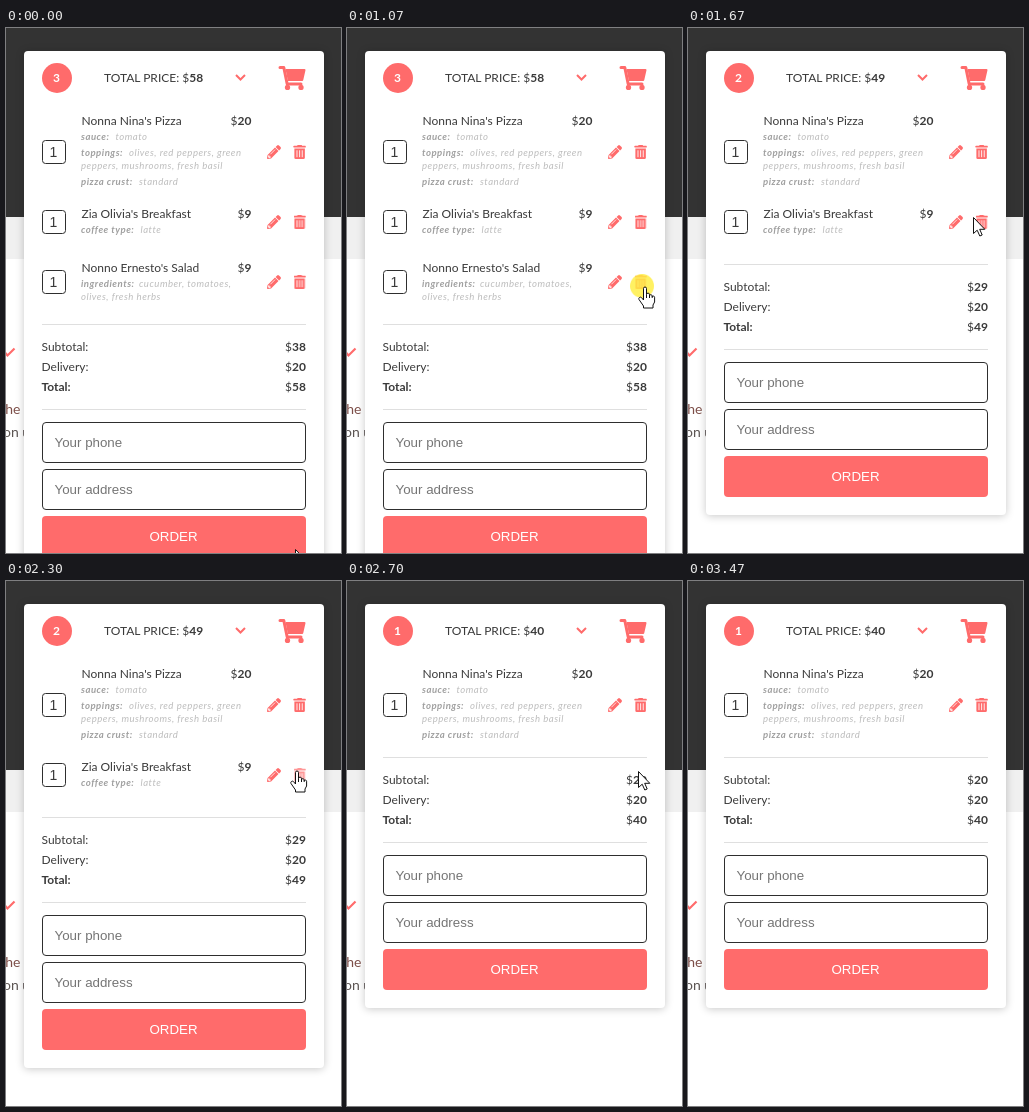
An HTML page for the animation above (3.85 s loop, 335x525 px).

```html
<!DOCTYPE html>
<html lang="en">
<head>
<meta charset="utf-8">
<title>Shopping cart</title>
<style>
  html, body { margin: 0; width: 100%; height: 100%; overflow: hidden; background: #fff; }
  .stage { position: relative; width: 335px; height: 525px; overflow: hidden;
    background: linear-gradient(#333 189px, #f0f0f0 189px 231px, #fff 231px); }
  .stage > svg { position: absolute; left: 0; top: 0; }
  .card { position: absolute; left: 18px; top: 23px; width: 300px; height: 524px;
    background: #fff; border-radius: 4px; box-shadow: 0 1px 8px rgba(0, 0, 0, .22); }

  text { font: 12px Lato, sans-serif; fill: #3a3a3a; }
  b, .b { font-weight: 700; }
  .end { text-anchor: end; }
  .mid { text-anchor: middle; }
  .label, .value { font-size: 9.6px; font-style: italic; letter-spacing: .5px; }
  .label { font-weight: 700; fill: #a0a0a0; }
  .value { fill: #bdbdbd; }
  .ui { font: 13.333px "Liberation Sans", Arial, sans-serif; }
  .hint { fill: #757575; }
  .white { fill: #fff; }
  .copy { font-size: 14px; }
  .red { fill: #ff6b6b; }
  .line { fill: none; stroke: #ff6b6b; }
  .rule { stroke: #dfdfdf; }
  .field { fill: #fff; stroke: #2e2e2e; }

  /* every animation shares one loop and holds its value between keys */
  .card, .one, .two, .three, .kept, .below, .cursor, .arrow, .hand, .ring, .hot3, .hot2 {
    animation: 3850ms step-end infinite; }
  .card { animation-name: shrink; }
  .below { animation-name: rise; }
  .one { animation-name: one; }
  .two { animation-name: two; }
  .three { animation-name: three; }
  .kept { animation-name: kept; }
  .hot3 { animation-name: hot3; }
  .hot2 { animation-name: hot2; }
  .cursor { animation-name: move; }
  .arrow { animation-name: arrow; }
  .hand { animation-name: hand; }
  .ring { animation-name: ring; fill: #ffec2e; }

  @keyframes shrink { 0% { height: 524px } 29.6% { height: 464px } 67.52%, 100% { height: 404px } }
  @keyframes rise {
    0% { transform: translateY(0) }
    29.6% { transform: translateY(-60px) }
    67.52%, 100% { transform: translateY(-120px) }
  }
  @keyframes one { 0% { opacity: 1 } 29.6%, 100% { opacity: 0 } }
  @keyframes two { 0%, 67.52%, 100% { opacity: 0 } 29.6% { opacity: 1 } }
  @keyframes three { 0% { opacity: 0 } 67.52%, 100% { opacity: 1 } }
  @keyframes kept { 0% { opacity: 1 } 67.52%, 100% { opacity: 0 } }
  @keyframes hot3 { 0% { opacity: 1 } 22.8%, 100% { opacity: .7 } }
  @keyframes hot2 { 0% { opacity: 1 } 47.78%, 100% { opacity: .7 } }
  @keyframes arrow { 0%, 29.6%, 67.52%, 100% { opacity: 1 } 22.8%, 49.86% { opacity: 0 } }
  @keyframes hand { 0%, 29.6%, 67.52%, 100% { opacity: 0 } 22.8%, 49.86% { opacity: 1 } }
  @keyframes ring {
    0%, 29.6%, 63.63%, 100% { opacity: 0; transform: scale(1) }
    27.79% { opacity: .75; transform: scale(1) }
    61.55% { opacity: .75; transform: scale(1.25) }
  }
  @keyframes move {
    0% { transform: translate(289px, 521px) }
    1.81% { transform: translate(289px, 521px); animation-timing-function: steps(3, jump-start) }
    7.5% { transform: translate(293px, 372px); animation-timing-function: steps(4, jump-start) }
    15.06% { transform: translate(294px, 270px) }
    15.32% { transform: translate(295px, 269px) }
    17.1% { transform: translate(295px, 269px); animation-timing-function: steps(4, jump-start) }
    24.8% { transform: translate(298px, 259px) }
    29.6% { transform: translate(289px, 248px) }
    37.4% { transform: translate(289px, 248px); animation-timing-function: steps(4, jump-start) }
    45.2% { transform: translate(285px, 189px) }
    47.78% { transform: translate(288px, 190px) }
    49.86% { transform: translate(291px, 190px) }
    71.94% { transform: translate(291px, 190px); animation-timing-function: steps(5, jump-start) }
    81.8% { transform: translate(299px, 382px); animation-timing-function: steps(5, jump-start) }
    91.69%, 100% { transform: translate(315px, 526px) }
  }
</style>
</head>
<body>
<div class="stage">
  <svg width="335" height="525">
    <path class="line" stroke-width="2.2" d="M-2 323.500L1.500 327.500 8.500 320.500"/>
    <text class="copy end" x="14.500" y="386" style="fill:#7d4f49">the</text>
    <text class="copy" x="-3" y="409" style="fill:#5c5553">on us</text>
  </svg>
  <div class="card"></div>
  <svg width="335" height="525">
    <defs>
      <g id="pencil" transform="scale(.0273)">
        <path class="red" d="M498 142L443 197 315 69 370 14Q404-14 438 14L498 74Q526 108 498 142ZM293 91L22 362 0 484Q0 512 28 512L150 490 421 219Z"/>
        <path class="white" d="M88 424H136V460L72 472 40 440 52 376H88Z"/>
        <path d="M134 330L288 176" stroke="#fff" stroke-width="28" stroke-linecap="round"/>
      </g>
      <g id="trash" transform="scale(.0273)">
        <path class="red" d="M32 128H416V464A48 48 0 0 1 368 512H80A48 48 0 0 1 32 464Z"/>
        <rect class="red" y="32" width="448" height="64" rx="16"/>
        <rect class="red" x="136" width="176" height="60" rx="24"/>
        <path d="M128 208V432M224 208V432M320 208V432" stroke="#fff" stroke-width="32" stroke-linecap="round"/>
      </g>
      <g id="count">
        <rect class="field" x="36.500" y="-11.500" width="23" height="23" rx="3"/>
        <text class="ui mid" x="47.500" y="5" style="font-size:14px">1</text>
        <use href="#pencil" x="0" y="0" transform="translate(261 -7)"/>
      </g>
    </defs>

    <!-- header -->
    <circle class="red" cx="51" cy="50" r="15"/>
    <g class="b">
      <text class="b mid white one" x="50.500" y="54">3</text>
      <text class="b mid white two" x="50.500" y="54">2</text>
      <text class="b mid white three" x="50.500" y="54">1</text>
    </g>
    <text class="one" x="98" y="54">TOTAL PRICE: $<tspan class="b">58</tspan></text>
    <text class="two" x="98" y="54">TOTAL PRICE: $<tspan class="b">49</tspan></text>
    <text class="three" x="98" y="54">TOTAL PRICE: $<tspan class="b">40</tspan></text>
    <path class="line" stroke-width="2" d="M230 47L234.500 51.500 239 47"/>
    <g transform="translate(272.500 38) scale(.0469)">
      <path class="line" stroke-width="64" stroke-linecap="round" stroke-linejoin="round" d="M32 32H113L185 384H480"/>
      <path class="red" d="M150 64H552Q580 64 575 93L528 301Q524 320 505 320H200Z"/>
      <circle class="red" cx="192" cy="456" r="56"/>
      <circle class="red" cx="480" cy="456" r="56"/>
    </g>

    <!-- items -->
    <g>
      <use href="#count" transform="translate(0 124)"/>
      <use href="#trash" transform="translate(287.500 117)"/>
      <text x="75.500" y="97">Nonna Nina's Pizza</text>
      <text class="end" x="245.500" y="97">$<tspan class="b">20</tspan></text>
      <text class="label" x="75" y="112">sauce:</text>
      <text class="value" x="109.500" y="112">tomato</text>
      <text class="label" x="75" y="128">toppings:</text>
      <text class="value" x="123" y="128">olives, red peppers, green</text>
      <text class="value" x="75" y="141">peppers, mushrooms, fresh basil</text>
      <text class="label" x="75" y="157">pizza crust:</text>
      <text class="value" x="133" y="157">standard</text>
    </g>
    <g class="kept">
      <use href="#count" transform="translate(0 194)"/>
      <g class="hot2"><use href="#trash" transform="translate(287.500 187)"/></g>
      <text x="75.500" y="190">Zia Olivia's Breakfast</text>
      <text class="end" x="245.500" y="190">$<tspan class="b">9</tspan></text>
      <text class="label" x="75" y="205">coffee type:</text>
      <text class="value" x="134.500" y="205">latte</text>
    </g>
    <g class="one">
      <use href="#count" transform="translate(0 254)"/>
      <g class="hot3"><use href="#trash" transform="translate(287.500 247)"/></g>
      <text x="75.500" y="244">Nonno Ernesto's Salad</text>
      <text class="end" x="245.500" y="244">$<tspan class="b">9</tspan></text>
      <text class="label" x="75" y="259">ingredients:</text>
      <text class="value" x="133" y="259">cucumber, tomatoes,</text>
      <text class="value" x="75" y="272">olives, fresh herbs</text>
    </g>

    <!-- totals and form -->
    <g class="below">
      <path class="rule" d="M36 296.500H300M36 381.500H300"/>
      <text x="35.500" y="323">Subtotal:</text>
      <text x="35.500" y="343">Delivery:</text>
      <text class="b" x="35.500" y="363">Total:</text>
      <text class="end one" x="300" y="323">$<tspan class="b">38</tspan></text>
      <text class="end two" x="300" y="323">$<tspan class="b">29</tspan></text>
      <text class="end three" x="300" y="323">$<tspan class="b">20</tspan></text>
      <text class="end" x="300" y="343">$<tspan class="b">20</tspan></text>
      <text class="end one" x="300" y="363">$<tspan class="b">58</tspan></text>
      <text class="end two" x="300" y="363">$<tspan class="b">49</tspan></text>
      <text class="end three" x="300" y="363">$<tspan class="b">40</tspan></text>
      <rect class="field" x="36.500" y="394.500" width="263" height="40" rx="3.500"/>
      <rect class="field" x="36.500" y="441.500" width="263" height="40" rx="3.500"/>
      <text class="ui hint" x="48.500" y="419">Your phone</text>
      <text class="ui hint" x="48.500" y="466">Your address</text>
      <rect class="red" x="36" y="488" width="264" height="41" rx="4"/>
      <text class="ui mid white" x="167.500" y="513">ORDER</text>
    </g>

    <!-- pointer -->
    <g class="cursor">
      <g transform="translate(-3 -1)"><circle class="ring" r="12"/></g>
      <path class="arrow" fill="#fff" stroke="#111" d="M.5 .5V16.500L4.200 13.200 6.800 19 9.200 18 6.700 12.300H11.800Z"/>
      <g class="hand" fill="#fff" stroke="#111" stroke-linejoin="round">
        <path d="M-1.500 13V1.500a1.500 1.500 0 0 1 3 0V7.500a1.500 1.500 0 0 1 3 .3v.8a1.400 1.400 0 0 1 2.700 .3v.8a1.300 1.300 0 0 1 2.400 .5V15L8 18v3H-1.500v-2L-6 12.500a1.600 1.600 0 0 1 2.400-2Z"/>
        <path d="M1.500 7.500V11M4.500 8V11M7.200 9V11"/>
      </g>
    </g>
  </svg>
</div>
</body>
</html>
```
